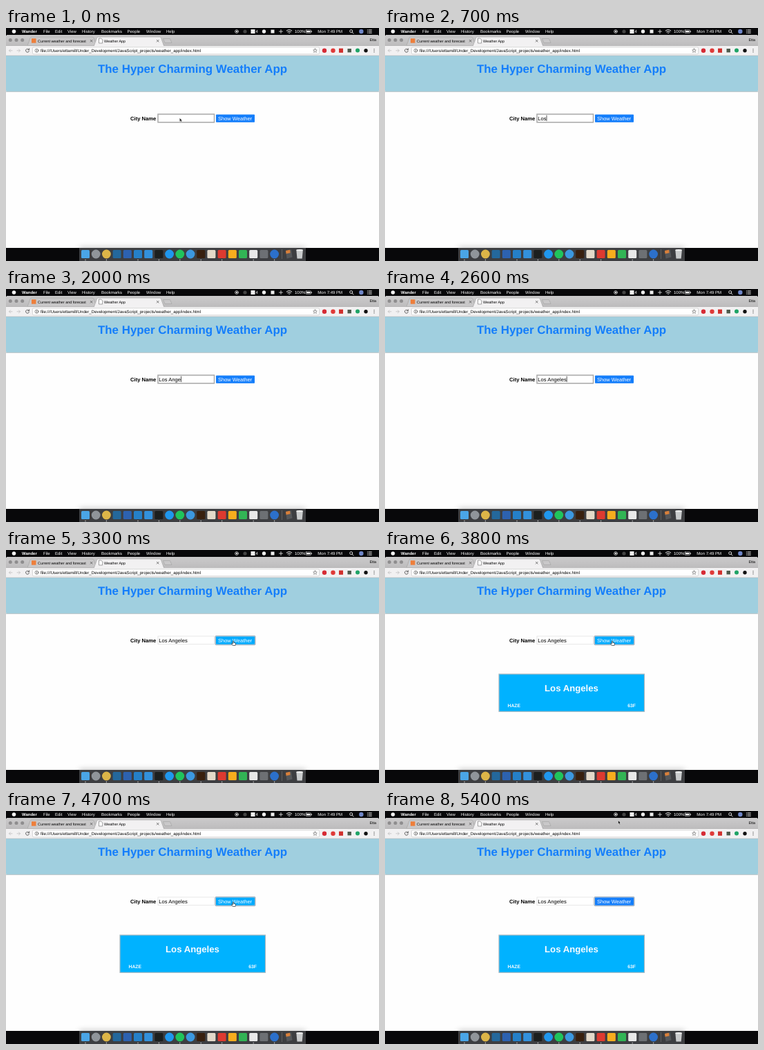
Animation of 540x338 px, one loop 5500 ms. Source, as an HTML page:

```html
<!DOCTYPE html>
<html lang="en">
<head>
<meta charset="utf-8">
<title>Weather App</title>
<style>
  html, body { margin: 0; width: 100%; height: 100%; overflow: hidden; background: #08080a; }
  svg { display: block; width: 100%; height: 100%; }
  text { font-family: "Liberation Sans", Arial, sans-serif; text-rendering: geometricPrecision; white-space: pre; }
  .b { font-weight: bold; }
  .menu { font-size: 6px; fill: #fff; }
  .tab { font-size: 5.4px; fill: #000; }
  .line { fill: none; stroke-linecap: round; stroke-linejoin: round; }
</style>
</head>
<body>
<svg viewBox="0 0 540 338" xmlns="http://www.w3.org/2000/svg">
  <defs>
    <linearGradient id="strip" x2="0" y2="1">
      <stop stop-color="#cbcacb"/><stop offset="1" stop-color="#bdbcbd"/>
    </linearGradient>
    <filter id="blur" x="-10%" y="-150%" width="120%" height="400%"><feGaussianBlur stdDeviation="4"/></filter>
    <clipPath id="page"><rect y="40" width="540" height="279"/></clipPath>
  </defs>

  <!-- menu bar -->
  <rect width="540" height="338" fill="#08080a"/>
  <circle cx="11.5" cy="5" r="2.8" fill="#f2f2f2"/>
  <g id="menu"></g>
  <g id="status">
    <circle cx="334" cy="5" r="2.4" class="line" stroke="#ddd" stroke-width=".8"/>
    <circle cx="334" cy="5" r="1.2" fill="#ddd"/>
    <circle cx="346" cy="5" r="2.6" fill="#444"/>
    <rect x="354.500" y="2" width="6" height="6" fill="#f2f2f2"/>
    <circle cx="373.500" cy="5" r="2.700" fill="#eee"/>
    <rect x="383.500" y="2.500" width="5" height="5" fill="#eee"/>
    <path class="line" stroke="#eee" stroke-width=".8" d="M395.500 5h5M398 2.500v5"/>
    <path class="line" stroke="#eee" stroke-width="1" d="M406.200 4q3.800-3 7.600 0M407.700 5.700q2.300-1.700 4.600 0M409.600 7.300h.8"/>
    <rect x="434" y="2.900" width="7.600" height="4.400" rx=".7" class="line" stroke="#eee" stroke-width=".6"/>
    <path d="M435 3.900h5.600v2.400h-5.600zM442.200 4.300h.8v1.600h-.8z" fill="#eee"/>
    <path class="line" stroke="#eee" stroke-width=".9" d="M501.300 6.200l1.700 1.800M501.700 4.500a2 2 0 1 1-4 0a2 2 0 1 1 4 0"/>
    <circle cx="514.300" cy="5" r="3.200" fill="#6f86c8"/>
    <path class="line" stroke="#eee" stroke-width=".9" d="M523.300 2.800h.3M525 2.800h4.300M523.300 5h.3M525 5h4.300M523.300 7.200h.3M525 7.200h4.300"/>
  </g>

  <!-- browser window -->
  <path d="M0 319V13q0-3 3-3h534q3 0 3 3v306z" fill="#fefefe"/>
  <path d="M0 26V13q0-3 3-3h534q3 0 3 3v13z" fill="url(#strip)"/>
  <g fill="#8e8d8e">
    <circle cx="6.300" cy="17.500" r="2.500"/>
    <circle cx="15" cy="17.500" r="2.500"/>
    <circle cx="23.700" cy="17.500" r="2.500"/>
  </g>
  <path d="M31 25.500l4-11q.5-1.500 2-1.500h88q1.500 0 2 1.500l4 11z" fill="#c9c8c9" stroke="#a2a2a2" stroke-width=".6"/>
  <rect y="25.500" width="540" height="14.500" fill="#f2f1f2"/>
  <path d="M0 25.500h540" stroke="#a2a2a2" stroke-width=".6"/>
  <path d="M127.500 26l4-11.500q.5-1.500 2-1.500h89q1.500 0 2 1.500l4 11.500z" fill="#f2f1f2"/>
  <path class="line" stroke="#a2a2a2" stroke-width=".6" d="M127.500 25.500l4-11q.5-1.500 2-1.500h89q1.500 0 2 1.500l4 11"/>
  <path d="M227.500 15.500h10l2.500 6h-10z" fill="#c9c8c9" stroke="#a2a2a2" stroke-width=".6"/>
  <rect x="37" y="15.200" width="6.500" height="6.500" fill="#ee7f3b"/>
  <path d="M134.500 15h3.200l2 2v5h-5.200z" fill="#fff" stroke="#666" stroke-width=".6"/>
  <path class="line" stroke="#444" stroke-width=".7" d="M122.200 17.300l2.800 2.800m0-2.800l-2.800 2.800M218.300 17.300l2.800 2.800m0-2.800l-2.800 2.800"/>
  <text class="tab" x="46" y="20.500">Current weather and forecast</text>
  <text class="tab" x="142" y="20.500">Weather App</text>
  <text class="tab" x="536" y="19.200" text-anchor="end">Etta</text>

  <!-- toolbar -->
  <path class="line" stroke="#c4c4c4" stroke-width=".9" d="M9 32.800H4.500m2-2l-2 2l2 2M16 32.800h4.500m-2-2l2 2l-2 2"/>
  <path class="line" stroke="#555" stroke-width=".9" d="M33.300 31.500a2.500 2.500 0 1 0 .2 2M33.600 29.800v2h-2"/>
  <rect x="38.500" y="27.800" width="415" height="10" rx="1.500" fill="#fff" stroke="#c2c2c2" stroke-width=".6"/>
  <circle cx="44.500" cy="32.700" r="2.500" class="line" stroke="#555" stroke-width=".7"/>
  <path class="line" stroke="#555" stroke-width=".8" d="M44.500 32.500v1.500M44.500 31.300v.1"/>
  <text x="50" y="34.700" font-size="6.150">file:///Users/ettamill/Under_Development/JavaScript_projects/weather_app/index.html</text>
  <path class="line" stroke="#555" stroke-width=".6" d="M447.500 29.900l.8 1.900 2 .2-1.500 1.400.5 2-1.800-1.100-1.800 1.100.5-2-1.500-1.400 2-.2z"/>
  <circle cx="461" cy="32.700" r="3.200" fill="#d62b35"/>
  <circle cx="473.500" cy="32.700" r="3.200" fill="#df3a38"/>
  <rect x="482" y="29.600" width="6" height="6.200" fill="#cf302d"/>
  <rect x="494.500" y="30" width="5.400" height="5.400" fill="#4d5a4c"/>
  <circle cx="509" cy="32.500" r="3" fill="#1fa366"/>
  <circle cx="521" cy="32.700" r="2.700" fill="#111"/>
  <path class="line" stroke="#555" stroke-width="1.200" d="M533 30.600v.1M533 32.700v.1M533 34.800v.1"/>

  <!-- page -->
  <path d="M0 40h540v50.500q0 1.500-1.500 1.500H1.500Q0 92 0 90.500z" fill="#a0cfdf"/>
  <path d="M0 40h540" stroke="#b5b5b5" stroke-width=".6"/>
  <path d="M0 92.300h540" stroke="#b4c0c4" stroke-width="1"/>
  <text class="b" x="270" y="65.400" font-size="16.900" text-anchor="middle" fill="#147efb">The Hyper Charming Weather App</text>
  <text class="b" x="180" y="133.600" font-size="7.650">City Name</text>
  <rect id="field" x="220" y="125" width="81.500" height="11.800" fill="#fff"/>
  <text id="typed" x="221.300" y="133.600" font-size="7.600"></text>
  <rect id="caret" y="126.500" width=".7" height="8.500" fill="#111"/>
  <rect id="ring" x="303.300" y="124.700" width="57.400" height="12.800" rx="1" fill="none" stroke="#a5b4c2" stroke-width="1.600"/>
  <rect id="button" x="304" y="125.400" width="56" height="11.400" rx=".8"/>
  <text x="307" y="133.600" font-size="7.500" fill="#fff">Show Weather</text>
  <g id="card">
    <rect x="165" y="180" width="210.500" height="54.300" fill="#00b2ff" stroke="#a8b8c0" stroke-width="1.200"/>
    <g class="b" fill="#f6fbff">
      <text x="270" y="205.400" font-size="13.200" text-anchor="middle">Los Angeles</text>
      <text x="177.500" y="228.200" font-size="6.800">HAZE</text>
      <text x="363" y="228.200" font-size="6.800" text-anchor="end">63F</text>
    </g>
  </g>

  <!-- dock -->
  <g clip-path="url(#page)">
    <rect x="106" y="318" width="328" height="20" fill="#000" opacity=".22" filter="url(#blur)"/>
  </g>
  <rect x="106" y="319" width="328" height="19" fill="#3d3e41"/>
  <path d="M399.500 321v14" stroke="#77787a" stroke-width=".6"/>
  <g id="dock"></g>
  <path d="M405 323l8-1.500 1.500 11-8 2z" fill="#55575a"/>
  <path d="M405 323l6-1.200 .6 4.500-6 1.200z" fill="#d9803a"/>
  <path d="M420.300 322h9.600l-1.200 12.500h-7.200z" fill="#c9cbcc"/>
  <ellipse cx="425.100" cy="322.300" rx="4.900" ry="1.200" fill="#eceded"/>

  <!-- pointers, hot spot at 0,0 -->
  <path id="arrow" d="M0 0v5.400l1.300-1.100 .9 2 1-.5-.9-1.900h1.700z" fill="#111" stroke="#fff" stroke-width=".5"/>
  <path id="hand" d="M-.7 0q.7-.9 1.300 0v2l2.300.6q.8.200.6 1.200l-.5 2.400h-3.600l-2-2.700q.2-1 1.300-.3l.6.500z" fill="#fff" stroke="#111" stroke-width=".6"/>
</svg>
<script>
const LOOP = 5500, STEP = 100;
const CITY = 'Los Angeles';
const KEYS = [400, 500, 600, 1000, 1300, 1500, 1700, 1900, 2100, 2300, 2500];
const CLICK = 3300, RESULT = 3500;
// time, x, y
const PATH = [[0, 251.3, 130.5], [2700, 251.3, 130.5], [3200, 329, 132.3], [4850, 329, 132.3], [5350, 337.5, 13.6]];

const $ = id => document.getElementById(id);
const add = (parent, tag, attrs, text = '') => {
  const el = document.createElementNS('http://www.w3.org/2000/svg', tag);
  for (const k in attrs) el.setAttribute(k, attrs[k]);
  el.textContent = text;
  $(parent).append(el);
};
const show = (id, on) => $(id).setAttribute('visibility', on ? 'visible' : 'hidden');

[['Wander', 23], ['File', 54], ['Edit', 71], ['View', 89], ['History', 110], ['Bookmarks', 138],
 ['People', 175.5], ['Window', 203], ['Help', 232], ['4', 361.5], ['100%', 418], ['Mon 7:49 PM', 451.3]]
  .forEach(([label, x], i) => add('menu', 'text', { class: i ? 'menu' : 'menu b', x, y: 7.1 }, label));

// shape (c = circle, s = square) and colour; an asterisk marks a running app
['s#4aa5e6*', 'c#90959a', 'c#dcb548*', 's#24689c', 's#2d62b0', 's#2580c8*', 's#3391dc', 's#1c1f1e*', 'c#1f97ee',
 'c#20c45c*', 'c#3c98df', 's#38200e*', 's#e3d9c9', 's#dd3a30*', 's#f7ad1e', 's#32b455', 's#e8e8e8*', 's#6d7074', 'c#2c70cb*']
  .forEach((spec, i) => {
    const x = 115 + 15.2 * i, fill = spec.slice(1, 8);
    if (spec[0] === 'c') add('dock', 'circle', { cx: x, cy: 328, r: 6.4, fill });
    else add('dock', 'rect', { x: x - 6, y: 322, width: 12, height: 12, rx: 1.5, fill });
    if (spec.endsWith('*')) add('dock', 'circle', { cx: x, cy: 336.5, r: .7, fill: '#ddd' });
  });

function pointerAt(t) {
  const i = PATH.findIndex(p => p[0] > t);
  if (i < 0) return PATH[PATH.length - 1].slice(1);
  const [a, b] = [PATH[i - 1], PATH[i]];
  const u = (t - a[0]) / (b[0] - a[0]), e = u * u * (3 - 2 * u);
  return [a[1] + (b[1] - a[1]) * e, a[2] + (b[2] - a[2]) * e];
}

function draw(t) {
  const count = KEYS.filter(k => k <= t).length;
  const focused = t < CLICK;
  $('typed').textContent = CITY.slice(0, count);
  const width = count ? $('typed').getSubStringLength(0, count) : 0;
  $('caret').setAttribute('x', 221.4 + width);
  show('caret', focused && count > 0 && (t - KEYS[count - 1]) % 1000 < 500);
  $('field').setAttribute('stroke', focused ? '#a8a8a8' : '#dcdcdc');
  $('field').setAttribute('stroke-width', focused ? 1.5 : .7);

  const [x, y] = pointerAt(t);
  const hover = x > 304 && x < 360 && y > 125 && y < 137;
  const typing = t >= KEYS[0] && t < 2700;
  for (const id of ['arrow', 'hand']) {
    $(id).setAttribute('transform', `translate(${x} ${y})`);
    show(id, !typing && (id === 'hand') === hover);
  }
  $('button').setAttribute('fill', hover ? '#00aaff' : '#147efb');
  show('ring', !focused);
  show('card', t >= RESULT);
}

let start;
function tick(now) {
  start ??= now;
  draw(Math.floor((now - start) % LOOP / STEP) * STEP);
  requestAnimationFrame(tick);
}
draw(0);
requestAnimationFrame(tick);
</script>
</body>
</html>
```
